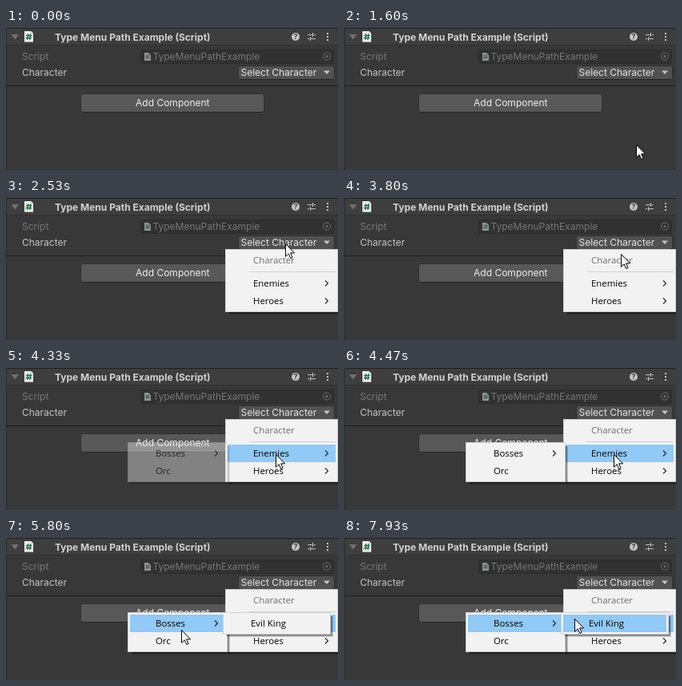
Recreate the animation shown at these times as an HTML page. Size 415 px wide and 178 px high, loop 8000 ms.

```html
<!DOCTYPE html>
<html lang="en">
<head>
<meta charset="utf-8">
<title>Type menu</title>
<style>
html, body { margin: 0; width: 100%; height: 100%; overflow: hidden; background: #383838; }
svg { display: block; width: 415px; height: 178px; }
.ui { font-family: Inter, sans-serif; font-size: 12px; fill: #c4c4c4; }
.menu text { font-family: "Open Sans", "Noto Sans", sans-serif; font-size: 11.4px; fill: #000; }
.menu .off { fill: #6d6d6d; }
</style>
</head>
<body>
<svg viewBox="0 0 415 178">
  <g class="ui">
    <rect width="415" height="178" fill="#383838"/>
    <rect width="415" height="21" fill="#3e3e3e"/>
    <rect width="415" height="1" fill="#1f1f1f"/>
    <rect y="21" width="415" height="1" fill="#303030"/>
    <rect width="1" height="178" fill="#2c2c2c"/>
    <path d="M6.5 8h9.5l-4.7 6.5z" fill="#707070"/>
    <path d="M23 4h8.5l2.5 2.5v11h-11z" fill="#f4f4f4"/>
    <path d="M31.5 4v2.5h2.5z" fill="#b8b8b8"/>
    <path d="M27.6 7l-.8 8M30.6 7l-.8 8M25 9.5h7.5M24.5 12.5h7.5" stroke="#1d6a3d" stroke-width="1.3"/>
    <text x="61" y="15.5" font-weight="700" fill="#d2d2d2">Type Menu Path Example (Script)</text>
    <circle cx="362" cy="11" r="5" fill="#c4c4c4"/>
    <text x="362" y="14.3" text-anchor="middle" font-size="9" font-weight="700" style="fill:#3e3e3e">?</text>
    <path d="M377 8.5h6M385 8.5h2M377 13.5h2M381 13.5h6M383.5 6v5M380.5 11v5" stroke="#c4c4c4" stroke-width="1.1"/>
    <path d="M401 6h2v2h-2zM401 10h2v2h-2zM401 14h2v2h-2z" fill="#c4c4c4"/>

    <text x="20" y="40" fill="#777">Script</text>
    <rect x="168.5" y="27.5" width="241" height="17" rx="2" fill="#313131" stroke="#2c2c2c"/>
    <path d="M173 31h5l3 3v7h-8z" fill="#929292"/>
    <path d="M176 33.5l-.6 5M178.5 33.5l-.6 5M174.5 35h5M174.5 37.3h5" stroke="#2f5540" stroke-width=".8"/>
    <text x="183.5" y="40" fill="#777">TypeMenuPathExample</text>
    <circle cx="401" cy="35.5" r="4.6" fill="none" stroke="#6c6c6c"/>
    <circle cx="401" cy="35.5" r="1.6" fill="#6c6c6c"/>

    <text x="20" y="60">Character</text>
    <rect x="290.5" y="47.5" width="120" height="17" rx="2.5" fill="#515151" stroke="#303030"/>
    <path d="M293 64.5h115" stroke="#242424"/>
    <text x="293.5" y="60" fill="#e4e4e4">Select Character</text>
    <path d="M397 53.5h8l-4 4.5z" fill="#c4c4c4"/>
    <rect y="72" width="415" height="1" fill="#1f1f1f"/>
    <rect x="93.5" y="82.5" width="229" height="23" rx="3" fill="#585858" stroke="#303030"/>
    <path d="M96 105.5h224" stroke="#242424"/>
    <text x="208.3" y="98" text-anchor="middle" fill="#eee">Add Component</text>
  </g>
  <g id="menus"></g>
  <g id="busy" fill="none">
    <circle cx="349" cy="57" r="7" stroke="#1a86e6" stroke-width="5"/>
    <circle cx="349" cy="57" r="7" stroke="#3aa8f8" stroke-width="2.4" stroke-dasharray="4 3.33"/>
  </g>
  <path id="cursor" d="M.5 .5v15.8l3.7-3.5 2.5 5.7 2.4-1-2.5-5.6h5z" fill="#fff" stroke="#000" stroke-width="1"/>
</svg>
<script>
const $ = id => document.getElementById(id);
const NS = "http://www.w3.org/2000/svg";
const LOOP = 8000, STEP = 1000 / 15;

function add(parent, tag, attrs, text) {
  const el = parent.appendChild(document.createElementNS(NS, tag));
  for (const k in attrs) el.setAttribute(k, attrs[k]);
  if (text) el.textContent = text;
  return el;
}

const box = (g, x, y, width, height, fill, extra) =>
  add(g, "rect", { x, y, width, height, fill, ...extra });

// Rows are 22 px high; the one at y = 96 can be highlighted.
function makeMenu(x, y, w, h, items) {
  const g = add($("menus"), "g", { class: "menu" });
  for (let i = 3; i > 0; i--) box(g, x + 5, y + 5, w - 5 + i, h - 5 + i, "#000", { opacity: 0.2 });
  box(g, x + 0.5, y + 0.5, w - 1, h - 1, "#f2f2f2", { stroke: "#d0d0d0" });
  const light = box(g, x + 3, 96, w - 6, 22, "#91c9f7");
  for (const [label, mid, arrow, off] of items) {
    add(g, "text", { x: x + 35, y: mid + 4, class: off ? "off" : "on" }, label);
    if (arrow) add(g, "path", {
      d: `M${x + w - 16} ${mid - 3.5}l3.5 3.5-3.5 3.5`, fill: "none", stroke: "#222", "stroke-width": 1.1
    });
  }
  return { g, light };
}

const main = makeMenu(274, 64, 141, 79, [
  ["Character", 78, false, true], ["Enemies", 107, true], ["Heroes", 129, true]
]);
box(main.g, 304, 92, 108, 1, "#d0d0d0");
const sub = makeMenu(152, 93, 125, 50, [["Bosses", 107, true], ["Orc", 129]]);
const leaf = makeMenu(271, 93, 135, 28, [["Evil King", 107]]);

// Cursor moves: resting step before, number of steps, quadratic path.
const moves = [
  [24, 8, 365, 146, 338, 80, 349, 57],
  [55, 6, 349, 57, 343, 82, 337, 108],
  [75, 5, 337, 108, 278, 111, 219, 115],
  [115, 4, 219, 115, 253, 108, 288, 101]
];
const clamp = v => Math.max(0, Math.min(1, v));
const ease = p => p * p * (3 - 2 * p);
const quad = (a, b, c, p) => (1 - p) * (1 - p) * a + 2 * p * (1 - p) * b + p * p * c;

function cursorAt(n) {
  const [start, count, ax, ay, bx, by, cx, cy] = moves.filter((m, i) => !i || n >= m[0]).pop();
  const p = ease(clamp((n - start) / count));
  return [Math.round(quad(ax, bx, cx, p)), Math.round(quad(ay, by, cy, p))];
}

const show = (el, on) => el.setAttribute("visibility", on ? "visible" : "hidden");
const fade = (menu, n, start) =>
  menu.g.setAttribute("opacity", n < start ? 0 : [0.4, 0.8][n - start] || 1);

function draw(t) {
  const n = Math.min(119, Math.floor((t + 4) / STEP));
  const [x, y] = cursorAt(n);
  const busy = n === 35;
  show($("busy"), busy);
  show($("cursor"), n >= 24 && !busy);
  $("cursor").setAttribute("transform", `translate(${x} ${y})`);
  fade(main, n, 36);
  fade(sub, n, 65);
  fade(leaf, n, 85);
  show(main.light, n > 55 && y >= 96);
  show(sub.light, n > 115 || n > 75 && x < 274);
  show(leaf.light, n > 115 && x >= 274);
}

const begin = performance.now();
function tick() {
  draw((performance.now() - begin) % LOOP);
  requestAnimationFrame(tick);
}
tick();
</script>
</body>
</html>
```
